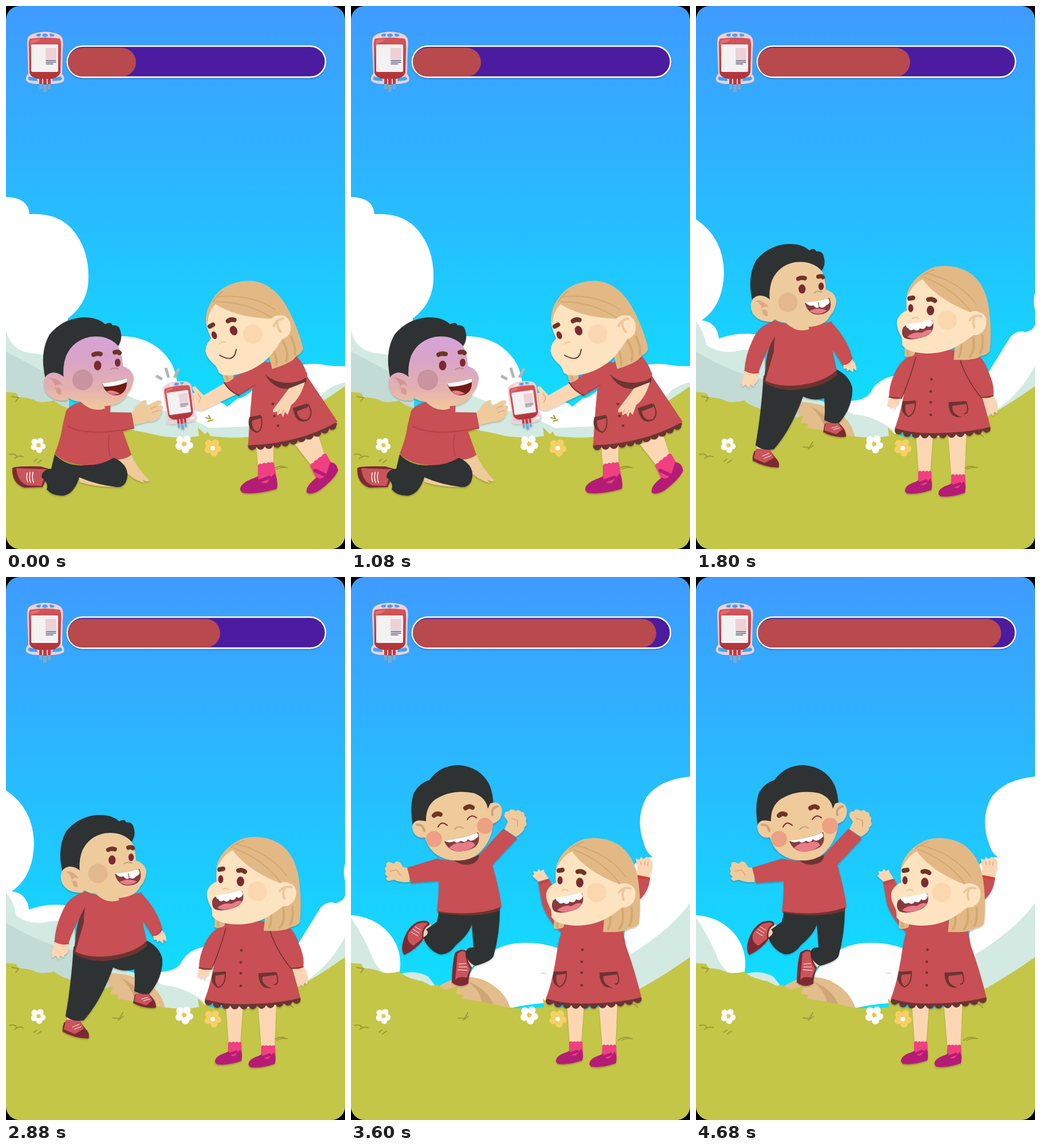
Animation, 592 px wide and 947 px high, one loop 5400 ms. Source, as an HTML page:

```html
<!DOCTYPE html>
<html lang="en">
<head>
<meta charset="utf-8">
<title>Blood donation</title>
<style>
html, body { margin: 0; width: 100%; height: 100%; overflow: hidden; background: #000; }
svg { display: block; width: 592px; height: 947px; stroke-width: 2; stroke-linecap: round; stroke-linejoin: round; }
.red { fill: #c84f52; } .dark { fill: #2e3130; } .maroon { fill: #6b3432; }
.skin { fill: #fde3c0; } .arm { fill: #fcd6b2; } .tan { fill: #efca9b; }
.rock { fill: #e3bd8b; } .crack { fill: #d0a677; }
.white { fill: #fff; } .mist { fill: #d2eae2; } .haze { fill: #c3dbd5; }
.hair { fill: #e2b985; } .wine { fill: #7b2a31; } .mouth { fill: #863a40; }
.tongue { fill: #e87b86; } .sock { fill: #f03f82; } .shoe { fill: #b51a75; } .sneak { fill: #c9555a; }
.face { fill: var(--face); } .cheek { fill: var(--cheek); }
.ln { fill: none; }
.m { stroke: #6b3432; } .f { stroke: #d8ab86; } .h { stroke: #d3a870; } .g { stroke: #9d9c38; }
.e { stroke: #7b2a31; } .w { stroke: #fff; } .c { stroke: #b34247; }
.brow { fill: none; stroke: #6d3428; stroke-width: 8; }
.scene { display: none; }
</style>
</head>
<body>
<svg viewBox="0 0 592 947">
<defs>
  <linearGradient id="sky" x2="0" y2="1">
    <stop stop-color="#3f9bff"/><stop offset=".35" stop-color="#29b9ff"/>
    <stop offset=".6" stop-color="#18d1ff"/><stop offset=".78" stop-color="#0fe0ff"/>
  </linearGradient>
  <linearGradient id="pale" gradientUnits="userSpaceOnUse" x1="0" y1="580" x2="0" y2="702">
    <stop stop-color="#d7a3d5"/><stop offset=".3" stop-color="#d8a4c8"/>
    <stop offset=".7" stop-color="#e3b0b0"/><stop offset="1" stop-color="#f0c79c"/>
  </linearGradient>
  <linearGradient id="blood" x2="0" y2="1">
    <stop stop-color="#d3565a"/><stop offset="1" stop-color="#b03437"/>
  </linearGradient>
  <filter id="soft" x="-10%" y="-10%" width="120%" height="120%">
    <feDropShadow dx="0" dy="2" stdDeviation="1" flood-opacity=".22"/>
  </filter>
  <clipPath id="stage"><rect width="592" height="947" rx="24"/></clipPath>
  <clipPath id="tube"><rect x="108" y="73" width="448" height="50" rx="25"/></clipPath>

  <g id="bag">
    <path fill="#7ba9cf" d="M58 136h5v9h-5zM65 137h6v13h-6zM73 136h5v9h-5z"/>
    <path fill="#f3cfd6" fill-rule="evenodd" d="M39 54Q45 46 68 45Q92 46 97 54Q101 58 99 75L98 119Q103 124 101 131Q97 135 82 136H54Q37 135 35 129Q34 123 39 118L37 66Q37 57 39 54ZM52 51Q54 54 60 53L61 48Q54 48 52 51ZM76 48L77 53Q83 54 85 51Q82 48 76 48ZM40 123Q36 129 43 130L55 131L54 126ZM82 126L81 131L94 130Q101 128 96 123Z"/>
    <ellipse cx="68" cy="51" rx="5" ry="3" fill="#4b9ff4"/>
    <path fill="url(#blood)" d="M42 57Q68 53 94 57Q97 61 96 79L95 116Q92 125 80 127H56Q44 125 41 117L40 73Q39 60 42 57Z"/>
    <path fill="#e57a7a" opacity=".7" d="M43 61Q50 57 60 58Q57 63 46 65L43 75Z"/>
    <rect x="44" y="67" width="47" height="48" rx="2" fill="#f3f1f2"/>
    <path fill="#eed1d7" d="M69 73h19v20H69z"/>
    <path stroke="#5c5c7a" stroke-width="1.3" d="M70 95h17M70 98h17M70 101h12"/>
    <path fill="#b93c42" d="M58 126h5v10h-5zM65 126h6v11h-6zM73 126h5v10h-5z"/>
  </g>

  <g id="flower">
    <circle cx="-6" cy="-6" r="5.500"/><circle cx="4" cy="-7" r="5.500"/><circle cx="8" cy="2" r="5.200"/>
    <circle cx="2" cy="8" r="5.500"/><circle cx="-7" cy="3" r="5.500"/>
  </g>

  <g id="boyHead">
    <path class="face" d="M100 650Q96 610 120 587Q150 568 184 579Q202 592 204 628Q222 634 223 650Q221 667 212 676Q203 696 172 698L173 702Q150 710 130 690Q112 689 100 675Z"/>
    <path class="dark" d="M69 650Q58 604 76 573Q98 546 133 543Q160 542 173 555Q183 549 186 557Q198 555 200 568Q204 580 196 593Q178 573 147 577Q117 583 105 610Q98 629 101 652Z"/>
    <path class="face" d="M100 646Q83 633 70 645Q62 656 69 672Q79 689 105 688Q116 680 113 662Z"/>
    <path fill="#b66c55" opacity=".35" d="M75 648Q91 648 99 662Q87 656 85 668Q97 660 97 677Q94 680 88 674Q87 656 75 648Z"/>
    <circle class="cheek" cx="134" cy="652" r="18"/>
    <path class="brow" d="M153 608Q159 605 165 607M190 604Q196 602 198 605"/>
    <ellipse class="wine" cx="160" cy="627" rx="6.500" ry="8.500"/><ellipse class="wine" cx="195" cy="622" rx="5" ry="7"/>
    <path class="ln" stroke="#a9715e" opacity=".55" d="M182 634Q190 629 196 633"/>
  </g>

  <g id="girlHead">
    <path class="hair" d="M364 611L369 502Q383 466 417 455Q449 449 476 464Q506 483 512 530Q517 570 513 602Q508 609 498 610Q488 619 450 617L454 575L386 592L381 609Q373 613 364 611Z"/>
    <path class="ln h" stroke-width="4" d="M500 575Q502 597 496 606M484 578Q488 600 478 612M463 590Q464 604 459 612M371 596L370 608"/>
    <path class="skin" d="M368 531Q366 508 371 495Q380 481 393 473Q419 511 481 535Q506 529 507 551Q505 573 484 574Q472 584 460 591Q433 607 400 606Q368 604 360 591Q361 580 357 574Q348 556 352 546Q357 535 368 531Z"/>
    <path class="hair" d="M369 506Q370 487 390 470L401 475Q386 479 376 494Z"/>
    <path class="ln h" d="M393 472Q402 464 416 460M398 473Q450 493 479 532M402 466Q459 479 490 521"/>
    <ellipse class="skin" cx="487" cy="553" rx="19" ry="21"/>
    <path class="ln" stroke="#ecc79d" stroke-width="4" d="M478 548Q485 538 498 541M487 542Q482 551 486 561"/>
    <circle cx="439" cy="548" r="17" fill="#fbd7b0"/>
    <path class="brow" d="M373 510L379 509M406 512Q412 510 417 514"/>
    <ellipse class="wine" cx="375" cy="527" rx="4.500" ry="7"/><ellipse class="wine" cx="409.500" cy="531" rx="6.500" ry="8.500"/>
    <path class="ln" stroke="#efc59d" d="M378 545Q383 541 389 545"/>
  </g>
  <g id="girlLaugh">
    <path class="mouth" d="M360 566Q361 558 370 556Q392 553 413 548Q419 568 401 576Q376 585 364 579Q359 574 360 566Z"/>
    <path class="tongue" d="M369 577Q380 567 394 570Q406 562 413 566Q406 576 390 579Q377 582 369 577Z"/>
    <path class="white" d="M367 555Q390 553 408 547Q416 549 413 555Q409 562 402 558Q399 566 391 562Q387 569 380 564Q373 568 371 562Q366 561 367 555Z"/>
  </g>

  <g id="girlBody">
    <path class="arm" d="M384 745H414L409 815H389ZM440 745H472L469 820H446Z"/>
    <path class="sock" d="M388 812q3-3 6 0q3-3 6 0q3-3 6 0q3-3 5 0L412 833L388 838ZM446 818q3-3 6 0q3-3 6 0q3-3 6 0q3-3 6 0L471 840L445 843Z"/>
    <path id="pump" class="shoe" d="M365 846Q364 836 383 830L389 827Q390 838 400 835L409 824Q414 833 411 844Q385 853 368 850Z"/>
    <use href="#pump" x="58.500" y="5"/>
    <path class="ln" stroke="#b51a75" stroke-width="5" d="M386 834L402 828M444 839L461 833"/>
    <path class="ln m" stroke-width="14" stroke-dasharray="0 15.500" d="M354 740Q373 748 405 747Q465 748 508 737"/>
    <path class="red" d="M382 600Q370 625 366 660Q358 710 347 737Q370 746 410 746Q470 746 514 734Q502 685 487 644L478 600Z"/>
    <path class="ln m" stroke-width="4" d="M350 739Q375 747 410 747Q470 747 511 737"/>
    <g class="maroon"><circle cx="411" cy="651" r="2.300"/><circle cx="410" cy="672" r="2.300"/><circle cx="410" cy="691" r="2.300"/><circle cx="410" cy="713" r="2.300"/></g>
    <path class="ln m" d="M362 690Q373 692 383 689Q384 711 371 716Q359 711 362 691ZM442 692Q457 694 472 691Q478 710 469 711"/>
    <path class="maroon" d="M361 690L383 688L382 693L366 695Q363 708 372 717Q355 711 361 690ZM441 691L472 689L472 694L448 697Q445 711 464 717Q441 720 441 691Z"/>
  </g>
</defs>

<g clip-path="url(#stage)">
  <rect width="592" height="947" fill="url(#sky)"/>

  <g class="scene">
    <path class="white" d="M0 333Q39 334 41 363Q91 360 117 391Q145 425 144 474Q144 518 108 545L110 680H0Z"/>
    <path class="mist" d="M0 565Q8 603 48 606Q78 606 110 640V720H0Z"/>
    <path class="haze" d="M0 603Q50 628 110 662V720H0Z"/>
    <path class="white" d="M190 576Q235 573 265 596Q297 621 299 660Q300 690 336 692Q377 685 386 699L405 684Q420 685 450 650L500 630Q530 620 562 627Q580 629 592 628V760H180Z"/>
    <path class="mist" d="M170 660Q235 690 275 706Q320 715 355 736Q410 734 450 732V760H170ZM500 705Q545 690 560 670Q575 660 592 656V760H500Z"/>
  </g>
  <g class="scene">
    <path class="white" d="M0 372Q48 404 49 466Q47 523 10 548Q37 552 40 580Q76 566 120 575V720H0ZM592 500Q588 515 592 530Z"/>
    <path class="white" d="M265 689Q300 688 307 670Q318 651 345 645L510 640Q536 598 549 577Q562 564 575 569Q590 565 592 556V760H265Z"/>
    <path class="mist" d="M0 550Q14 567 18 591Q37 605 66 603Q92 594 120 609V740H0Z"/>
    <path class="haze" d="M0 603Q70 645 130 653L185 690V740H0Z"/>
    <path class="mist" d="M180 675Q255 701 275 712Q310 714 345 740V760H180ZM510 714Q562 684 592 628V760H500Z"/>
    <path fill="#14d8ff" d="M338 748L368 744L386 753H345Z"/>
    <path class="rock" d="M178 690Q237 693 264 722Q274 735 278 752L180 742Z"/>
    <path class="crack" d="M200 698Q236 716 248 748L226 742Q222 718 200 698Z"/>
  </g>
  <g class="scene">
    <path class="white" d="M592 348Q539 353 516 384Q496 420 511 463Q516 482 527 488Q480 494 482 540L470 760H592Z"/>
    <path class="mist" d="M592 568Q560 614 488 658V760H592Z"/>
    <path class="white" d="M0 590C50 592 89 632 86 678L83 705H0ZM195 720C212 668 252 638 303 638Q352 637 390 662V744Q335 739 277 752Z"/>
    <path class="mist" d="M0 594Q22 627 36 660Q46 689 72 696Q110 682 135 697L165 735H0Z"/>
    <path class="rock" d="M146 719Q188 687 232 703Q270 721 279 754L190 740Z"/>
    <path class="crack" d="M200 703Q242 720 250 750L229 744Q226 720 200 703Z"/>
    <path stroke="#eed1d7" d="M333 691h1M336 691h1M339 691h1"/>
  </g>

  <path fill="#c4c647" d="M0 673L18 675L22 682Q43 683 55 690Q70 692 84 688Q97 700 125 705L140 713L150 711L165 720L187 714L183 727L196 729L194 736Q235 741 270 750Q310 755 337 750L335 735L348 747L352 742L357 750Q400 755 430 751Q500 728 592 663V947H0Z"/>
  <path class="ln g" d="M10 681L22 683L17 690M6 782Q17 779 19 787M15 789Q22 783 30 786M49 794L54 790M55 797L62 792M187 769L198 770L204 760M196 773L205 766M467 808Q476 800 487 804M473 808Q481 803 491 805M487 744Q496 744 501 751"/>
  <g fill="#fff"><use href="#flower" x="56" y="766"/><use href="#flower" transform="translate(311 764) scale(1.200)"/></g>
  <use href="#flower" transform="translate(361 770) scale(1.150)" fill="#f7cf65"/>
  <g fill="#f5c04f"><circle cx="57" cy="766" r="3.500"/><circle cx="311" cy="764" r="3.500"/></g>
  <circle cx="361" cy="771" r="4" fill="#fff"/>

  <g class="scene" style="--face:url(#pale);--cheek:#c9939f">
    <path class="ln g" d="M349 718L357 720L354 714M353 724L361 722"/>
    <g filter="url(#soft)">
      <path class="tan" d="M196 790L219 782Q228 805 250 827Q249 832 238 826L242 832Q219 825 207 810ZM128 820Q160 830 207 837Q165 842 128 830Z"/>
      <path class="red" d="M178 745L204 741L219 783Q204 793 188 791Z"/>
      <path class="wine" d="M11 806Q14 802 60 803L78 808L64 839L32 840Q10 833 11 806Z"/>
      <path class="sneak" d="M18 806L71 808L62 837L37 836Q20 830 18 806Z"/>
      <path class="ln w" stroke-width="1.500" d="M37 814Q35 823 38 830M42 813Q40 823 43 831M47 813Q45 823 48 831"/>
      <path class="dark" d="M85 782Q105 803 136 801L187 787Q214 799 212 821Q209 840 193 839Q158 835 128 822Q119 851 100 854Q81 855 71 843Q75 832 62 822Q62 809 79 807Z"/>
      <path class="red" d="M105 706Q117 689 145 690H183L180 746L188 788Q165 802 136 801Q100 797 85 781Q96 754 99 731Z"/>
      <path class="ln c" d="M181 744Q177 770 182 785"/>
      <path class="tan" d="M220 709Q233 688 244 687Q247 693 239 701L264 688Q273 687 271 692L263 698L271 696Q277 699 272 704L264 707L272 706Q275 711 267 714L270 715Q264 725 247 725L222 731Z"/>
      <path class="ln f" stroke-width="1.500" d="M254 702L265 697M256 709L267 705"/>
      <path class="red" d="M108 702Q130 692 162 708L219 709L224 735Q192 748 159 749Q125 746 104 733Z"/>
      <path class="ln c" d="M108 733Q144 752 223 736"/>
      <use href="#boyHead"/>
      <path fill="#711d13" d="M168 658Q190 657 211 651Q213 677 192 679Q173 678 168 658Z"/>
      <path class="white" d="M168 658Q191 656 211 650L211 656Q192 664 171 664Z"/>
      <path class="tongue" d="M176 672Q186 668 199 676Q184 681 176 672Z"/>
    </g>
    <g filter="url(#soft)">
      <path class="arm" d="M437 765L467 762V802H440ZM505 765L545 748L556 782L533 801Z"/>
      <path class="sock" d="M440 801q3-5 7-2q3-4 7-1q4-4 7-1q4-3 7 0L473 826L440 834ZM531 802q1-5 6-5q1-5 7-6q2-5 7-5q2-6 8-5L575 808L546 832Z"/>
      <path class="shoe" d="M409 844Q408 832 434 823L440 820Q441 835 456 831L469 815Q476 829 473 842Q435 853 413 849ZM525 848Q523 837 543 822Q550 828 559 818L566 796Q577 795 580 810Q573 826 547 845Q531 854 525 848Z"/>
      <path class="ln" stroke="#b51a75" stroke-width="6" d="M438 830L460 822M540 810L561 820"/>
      <path class="arm" d="M383 657L345 679L330 663Q321 663 330 675L320 674Q316 678 327 685L326 699Q334 708 346 704L405 676Z"/>
      <path class="ln f" stroke-width="1.500" d="M335 676L340 683L337 691"/>
      <path class="ln m" stroke-width="15" stroke-dasharray="0 14.500" d="M430 767Q505 765 573 730"/>
      <path class="red" d="M433 640Q460 615 501 605Q521 621 526 646L579 725Q513 764 423 767Q426 705 433 640Z"/>
      <path class="ln m" stroke-width="4" d="M426 768Q510 765 576 729"/>
      <path class="red" d="M381 657Q415 636 455 620L470 640Q438 662 407 679Q390 672 381 657Z"/>
      <path class="ln m" d="M381 657Q391 673 407 679"/>
      <path class="ln c" d="M407 678L435 661"/>
      <path class="maroon" d="M452 642Q469 658 495 657L524 648Q527 657 516 663Q490 672 474 664Q461 658 452 642Z"/>
      <path class="red" d="M458 630L499 607L526 641Q525 651 509 655Q484 661 465 649Z"/>
      <path class="maroon" d="M490 615L501 604L507 613Q500 620 490 615Z"/>
      <path class="arm" d="M494 667L522 656Q514 684 498 696L492 713L487 708L484 717L480 710L474 714L473 707Q464 712 467 703Z"/>
      <path class="ln f" stroke-width="1.500" d="M478 704L474 712M485 705L481 712"/>
      <path class="ln m" d="M426 718Q435 720 446 716Q449 739 439 743Q425 739 426 718ZM502 702Q516 701 528 695Q537 710 528 721Q510 729 502 702Z"/>
      <path class="maroon" d="M425 717L445 713V719L430 723Q428 739 441 745Q419 741 425 717ZM501 701L526 693L528 699L508 707Q510 722 526 723Q506 731 501 701Z"/>
      <g class="maroon"><circle cx="466" cy="694" r="2.300"/><circle cx="469" cy="715" r="2.300"/><circle cx="475" cy="732" r="2.300"/></g>
      <use href="#girlHead" transform="translate(431 572) rotate(-20) translate(-439 -548)"/>
      <path class="ln m" d="M373 609Q399 624 402 599"/>
    </g>
    <path class="ln" stroke="#b3b6b7" stroke-width="5" stroke-linecap="butt" d="M262 645L273 651M279 631L284 648M302 632L294 648"/>
    <use href="#bag" filter="url(#soft)" transform="translate(303 697) rotate(-8) scale(.81) translate(-68 -98)"/>
  </g>

  <g class="scene" style="--face:#eecb9d;--cheek:#e3b88c">
    <g filter="url(#soft)">
      <path class="arm" d="M87 637L107 640Q112 655 102 659L101 664L95 660L92 667L87 660L81 664Q77 654 87 637ZM257 622L272 616Q281 624 280 636L275 632L274 639L268 634L264 637L263 632L258 633Z"/>
      <path class="arm" d="M107 765H132L130 780H105ZM229 720H249V734H227Z"/>
      <path class="wine" d="M102 776Q98 784 99 793Q121 805 144 805Q148 797 138 787L130 776ZM225 728L249 727Q263 739 262 751Q242 754 222 743Z"/>
      <path class="sneak" d="M105 772L130 773L136 788L120 797L101 789ZM227 726L248 727L256 738L245 747L224 740Z"/>
      <path class="ln w" stroke-width="1" d="M116 785L128 780M119 789L131 784M237 736L248 733M240 739L251 736"/>
      <path class="dark" d="M118 645Q114 710 104 766Q117 777 136 773Q166 739 187 681Q205 690 224 684Q226 705 224 722Q237 730 250 727Q274 699 273 666Q268 645 246 634Z"/>
      <path class="red" d="M235 550Q266 582 273 614Q266 627 255 625L238 598Z"/>
      <path class="maroon" d="M137 570L117 654Q131 669 170 670Q224 665 247 643L244 633Z"/>
      <path class="red" d="M135 548Q180 565 237 550L239 604L246 635Q220 659 170 662Q138 663 121 653L136 602Z"/>
      <path class="maroon" d="M138 572Q119 608 122 644Q136 612 138 572Z"/>
      <path class="red" d="M144 547Q111 555 101 578Q86 609 85 634Q96 642 109 639Q120 607 139 574Z"/>
      <path class="ln" stroke="#d83c3c" d="M85 635Q96 642 109 639M256 625Q266 626 272 615"/>
      <use href="#boyHead" transform="translate(95 415) scale(.95 .935) translate(-65 -543)"/>
      <path class="mouth" d="M190 518Q214 518 233 509Q241 531 222 537Q197 543 190 518Z"/>
      <path class="tongue" d="M198 532Q213 524 229 531Q214 542 198 532Z"/>
      <path class="white" d="M191 517Q211 516 231 510Q237 518 227 522Q223 528 216 525Q210 529 205 522Q198 525 191 517Z"/>
      <path class="ln e" stroke-width="1" d="M214 517L215 526"/>
    </g>
    <g filter="url(#soft)">
      <path class="arm" d="M337 682L356 685Q356 694 350 696L347 704L344 697L340 701L338 696L334 697ZM499 683L519 679Q530 694 526 711L521 707L519 715L514 709L507 714Q510 702 499 683Z"/>
      <use href="#girlBody"/>
      <path class="red" d="M386 606Q360 611 347 640Q337 662 337 682Q347 688 358 684Q376 648 386 606ZM477 600Q502 608 512 641Q522 664 519 680Q509 687 498 682Q469 649 459 612Z"/>
      <path class="ln m" stroke-width="1.500" d="M384 612Q374 650 359 684L337 682M460 613Q470 649 498 683L519 680"/>
      <use href="#girlHead"/><use href="#girlLaugh"/>
    </g>
  </g>

  <g class="scene">
    <g filter="url(#soft)">
      <path class="tan" d="M103 508L102 532Q83 533 76 528L66 530Q58 527 64 522Q57 519 61 513Q57 508 62 504Q60 497 67 497L75 500Q80 493 86 498L91 506ZM268 440L288 453Q303 445 303 436Q309 432 305 426Q308 419 303 417Q303 408 297 410Q294 404 288 408Q278 402 276 409Q267 407 268 418L274 427Z"/>
      <path class="ln" stroke="#e4a987" d="M68 513L80 511L86 520M280 421L291 425L291 435"/>
      <path class="arm" d="M124 608L139 606L148 621L133 637L123 631ZM196 652L211 646L217 675L208 684Z"/>
      <path class="wine" d="M117 601Q138 596 137 607Q124 613 127 631Q115 649 93 659Q86 650 92 632Q100 609 117 601ZM182 655Q194 646 203 653Q201 668 211 681Q205 697 205 709Q190 718 176 707Q177 670 182 655Z"/>
      <path class="sneak" d="M114 606Q129 600 134 605Q122 613 124 631L109 643Q94 635 101 619ZM186 657Q195 649 200 655Q199 669 208 683L202 699Q188 695 182 703Z"/>
      <path class="ln w" stroke-width="1" d="M105 619L117 626M108 614L119 621M112 610L122 616M188 675L201 674M188 680L202 680M187 685L203 686"/>
      <path class="dark" d="M154 583L150 601L131 615Q139 621 126 629Q135 651 155 658Q171 659 183 642Q205 624 211 606L214 646Q201 645 200 655Q203 673 217 678Q244 671 249 661Q260 621 260 577Z"/>
      <path class="maroon" d="M152 580Q218 590 261 574L260 582Q220 596 152 586Z"/>
      <path class="red" d="M150 491Q188 500 223 485L266 439L290 456L247 502Q259 545 263 575Q217 593 150 583Q154 551 153 530L105 534L98 507Z"/>
      <path class="maroon" d="M176 489Q201 497 224 484Q223 500 202 502Q184 501 176 489Z"/>
      <path class="dark" d="M108 434Q102 399 110 376Q120 359 137 354Q156 328 188 328Q225 331 241 361Q249 378 249 408L125 438Z"/>
      <path class="tan" d="M131 426Q107 420 107 438Q111 457 129 454Q138 486 171 493Q207 499 226 479Q247 457 248 430Q266 424 263 403Q258 389 243 395L239 404Q236 385 215 377Q176 369 147 388Q130 401 131 426Z"/>
      <path class="ln" stroke="#d3a27b" stroke-width="4" d="M115 432Q126 431 128 443M256 400Q244 403 247 415"/>
      <circle cx="145" cy="457" r="14" fill="#eda083"/><circle cx="234" cy="434" r="14" fill="#eda083"/>
      <path class="brow" d="M145 416Q150 411 156 414M200 403Q207 398 212 402"/>
      <path class="ln e" d="M152 436Q158 424 168 433M203 423Q211 412 219 420"/>
      <path class="ln" stroke="#cda078" d="M181 440Q189 432 196 438"/>
      <path class="mouth" d="M163 461Q195 456 222 445Q228 467 211 474Q174 488 163 461Z"/>
      <path class="tongue" d="M171 473Q181 461 195 464Q212 457 217 468Q204 480 184 479Z"/>
      <path class="white" d="M164 460Q195 456 220 446Q226 452 217 457Q209 463 204 457Q201 465 192 460Q185 466 180 461Q170 465 164 460Z"/>
    </g>
    <g filter="url(#soft)">
      <path class="arm" d="M327 531L345 526L337 513L337 510L331 513L328 509L325 514L318 513L320 519L316 521ZM499 520L521 524L526 508V494L520 490L516 488L511 492L506 488L504 493L497 491L501 507Z"/>
      <path class="ln f" stroke-width="1.500" d="M506 497L507 502M513 496V502M519 497L518 503"/>
      <path class="red" d="M327 533L346 527Q357 544 360 570L384 602L368 621Q341 596 333 568ZM499 520L522 524Q521 550 499 567L476 600L470 570Z"/>
      <path class="ln" stroke="#d83a35" stroke-width="4" d="M329 534L344 529M501 522L520 526"/>
      <use href="#girlBody" x="-7" y="-1"/>
      <use href="#girlHead" x="-10" y="2"/><use href="#girlLaugh" x="-9" y="4"/>
    </g>
  </g>

  <rect x="107" y="70" width="451" height="54" rx="27" fill="#4c1aa0" stroke="#fff" stroke-width="2.500" filter="url(#soft)"/>
  <g clip-path="url(#tube)"><rect id="level" x="82" y="73" height="50" rx="25" fill="#b8494d"/></g>
  <use href="#bag"/>
</g>
</svg>
<script>
const HOLD = 1800;
const levels = [227, 374, 533];
const scenes = [...document.querySelectorAll('.scene')];
const level = document.getElementById('level');

// Each step has a backdrop and a pair of figures.
function draw(t) {
  const step = Math.floor(t / HOLD) % levels.length;
  scenes.forEach((s, i) => { s.style.display = i % levels.length === step ? 'inline' : 'none'; });
  level.setAttribute('width', levels[step] - 82);
}

const start = performance.now();
function tick() {
  draw(performance.now() - start);
  requestAnimationFrame(tick);
}
tick();
</script>
</body>
</html>
```
